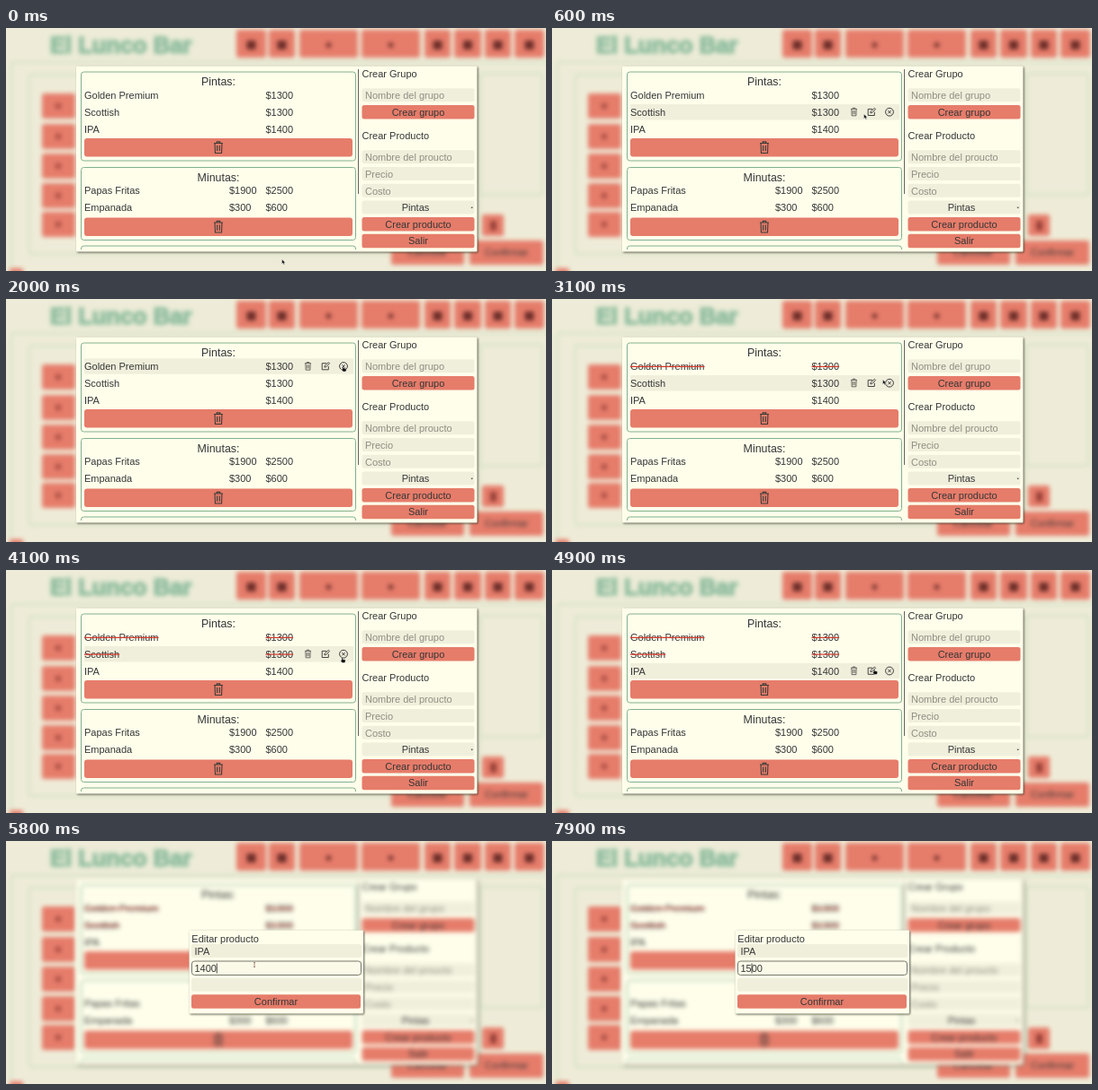
Write an HTML page that moves like this. It is 600 by 271 pixels and loops after 8000 ms.

```html
<!DOCTYPE html>
<html lang="es">
<head>
<meta charset="utf-8">
<style>
html, body { margin: 0; width: 100%; height: 100%; overflow: hidden; background: #eeecd8; }
svg { display: block; width: 600px; height: 271px; font: 11px "Liberation Sans", Arial, sans-serif; fill: #363636; }
#page { filter: blur(2.6px); }
.card { fill: #fefeeb; filter: drop-shadow(1px 1px 1px #3a3a2acc); }
.btn { fill: #e67c6a; }
.in { fill: #f0efdc; }
.ph { fill: #8f8e82; }
.h { font-size: 12.4px; }
.mid { text-anchor: middle; }
.box { fill: none; stroke: #82b08e; }
.pale { fill: none; stroke: #d3e0c3; stroke-width: 2; }
.icon { fill: none; stroke: #3c3c38; }
.strike { stroke: #d3392f; stroke-width: 1.2; }
</style>
</head>
<body>
<svg id="stage" viewBox="0 0 600 271">
  <defs>
    <path id="trash" d="M-4.5-4.5H4.5M-1.6-4.5V-6H1.6V-4.5M-3.6-4.5L-3.2 5.5H3.2L3.6-4.5M-1.2-2.3V3.4M1.2-2.3V3.4"/>
    <path id="edit" d="M1-3.5H-4V4H3.5V0M-1.2 1.2L-.8-.8L3.6-4.6L4.8-3.4L.8.8Z"/>
    <path id="close" d="M4.4 0A4.4 4.4 0 1 1-4.4 0A4.4 4.4 0 1 1 4.4 0M-1.7-1.7L1.7 1.7M1.7-1.7L-1.7 1.7"/>
  </defs>
  <g id="page"></g>
  <g id="panel"></g>
  <g id="dialog"></g>
  <g id="pointer">
    <path id="arrow" d="M0 0V5.2L1.3 4.1L2.2 6L3.2 5.5L2.3 3.7H4Z" fill="#111" stroke="#fff" stroke-width=".4"/>
    <path id="hand" d="M0 0Q.8-.6 1.2.2V2L4 2.6Q4.6 4.6 3.4 6H.6L-1.5 3.4L-.2 3.2Z" fill="#111" stroke="#fff" stroke-width=".4"/>
    <path id="beam" d="M-1-2.5H1M0-2.5V2.5M-1 2.5H1" fill="none" stroke="#93705f" stroke-width=".8"/>
  </g>
</svg>
<script>
const $ = id => document.getElementById(id);
const rect = (x, y, w, h, cls, r = 2.5) =>
  `<rect x="${x}" y="${y}" width="${w}" height="${h}" rx="${r}" class="${cls}"/>`;
const text = (x, y, s, cls = '') => `<text x="${x}" y="${y}" class="${cls}">${s}</text>`;
const icon = (name, x, y, k = 1) =>
  `<use href="#${name}" class="icon" transform="translate(${x} ${y}) scale(${k})"/>`;
const button = (x, y, w, h, label) =>
  rect(x, y, w, h, 'btn') + text(x + w / 2, y + 11.6, label, 'mid');
const input = (y, hint) => rect(395.5, y, 125, 15, 'in') + text(399, y + 11.8, hint, 'ph');

// Blurred page behind the panel
const top8 = [[256, 33], [292, 29], [326, 65], [395, 65], [465, 29], [498, 30], [532, 29], [565, 33]];
$('page').innerHTML =
  rect(6, 38, 640, 260, 'pale') + rect(26, 52, 500, 200, 'pale') + rect(527, 51, 69, 135, 'pale') +
  `<text x="49" y="28" fill="#86b799" stroke="#c0d8bd" stroke-width="3" paint-order="stroke" font-size="25.5" font-weight="700">El Lunco Bar</text>` +
  top8.map(([x, w]) => {
    const k = w > 60 ? 5 : 10;
    return rect(x, 2, w, 31, 'btn') + `<rect x="${x + w / 2 - k / 2}" y="${19 - k / 2}" width="${k}" height="${k}" fill="#6b2d28"/>`;
  }).join('') +
  [73, 107, 140, 173, 205].map(y =>
    rect(40, y, 37, 28, 'btn') + `<rect x="55" y="${y + 11}" width="6" height="6" fill="#a94e44"/>`).join('') +
  rect(529, 208, 24, 24, 'btn') + `<rect x="538" y="215" width="7" height="11" fill="#963f37"/>` +
  button(428, 237, 81, 27, '') + button(515, 237, 82, 27, '') +
  text(468, 254, 'Cancelar', 'mid') + text(556, 254, 'Confirmar', 'mid') +
  rect(4, 268, 15, 10, 'btn');

// Panel with product groups and forms
const rows = [
  { y: 75, name: 'Golden Premium', price: 1300, from: 2600 },
  { y: 93.7, name: 'Scottish', price: 1300, from: 3600 },
  { y: 112.5, name: 'IPA', price: 1400 },
  { y: 181.3, name: 'Papas Fritas', cost: 1900, price: 2500 },
  { y: 200, name: 'Empanada', cost: 300, price: 600 }
];
const group = (y, h, title) =>
  rect(83.5, y + .5, 305, h, 'box', 3) + text(236, y + 15.5, title, 'h mid') +
  rect(87, y + h - 24.5, 298, 20.5, 'btn', 3) + icon('trash', 236, y + h - 14, 1.1);

$('panel').innerHTML =
  rect(78, 42.5, 445.5, 207, 'card', 1) +
  group(48.5, 99, 'Pintas:') + group(155, 81, 'Minutas:') +
  '<path d="M83.5 247V246Q83.5 243 86.5 243H385.5Q388.5 243 388.5 246V247" class="box"/>' +
  '<path d="M391.5 46V185" stroke="#64645a"/>' +
  rows.map((r, i) => `<g id="hover${i}">${rect(87, r.y - 8.8, 299, 17.6, 'in', 1)}` +
    icon('trash', 335.5, r.y, .75) + icon('edit', 355, r.y, .95) + icon('close', 375, r.y) + '</g>' +
    `<g id="row${i}">` + text(87, r.y + 4, r.name) + (r.cost ? text(248, r.y + 4, '$' + r.cost) : '') +
    text(288.5, r.y + 4, '$' + r.price) + '</g>').join('') +
  text(395.5, 55, 'Crear Grupo') + input(67.3, 'Nombre del grupo') +
  button(395.5, 86, 125, 15.5, 'Crear grupo') +
  text(395.5, 124, 'Crear Producto') + input(136.2, 'Nombre del proucto') +
  input(155, 'Precio') + input(173.7, 'Costo') +
  rect(395.5, 192.4, 125, 15, 'in') + text(455, 204, 'Pintas', 'mid') +
  '<path d="M516.4 199.8H519L517.7 201.2Z"/>' +
  button(395.5, 211, 125, 15.5, 'Crear producto') + button(395.5, 229.8, 125, 15.5, 'Salir');

// Red lines as long as their labels
rows.forEach((r, i) => {
  if (!r.from) return;
  const lines = [...$('row' + i).children].map(el => {
    const x = +el.getAttribute('x');
    return `<path class="strike" d="M${x} ${r.y + .4}H${x + el.getComputedTextLength()}"/>`;
  });
  $('panel').insertAdjacentHTML('beforeend', `<g id="strike${i}">${lines.join('')}</g>`);
});

$('dialog').innerHTML =
  rect(203.5, 99.5, 193.5, 93, 'card', 1) + text(206.3, 112.5, 'Editar producto') +
  rect(206, 115, 189, 15, 'in') + text(209.5, 126.8, 'IPA') +
  rect(206, 134, 189, 15.5, 'in') +
  '<rect id="focus" x="206.5" y="134" width="188" height="15.5" rx="3" fill="#fbfae8" stroke="#77776c"/>' +
  '<text id="value" x="209.5" y="145.7"></text>' +
  '<path id="caret" d="M0 136.5V147.5" stroke="#333" stroke-width=".9"/>' +
  rect(206, 152.7, 189, 15, 'in') + button(206, 171.2, 188, 15.5, 'Confirmar');

// Pointer stops: time, x, y
const path = [
  [0, 306.5, 258], [100, 308, 250], [600, 346.5, 96], [900, 352, 90], [1300, 361.5, 74],
  [1800, 372, 75], [2000, 374, 75], [2800, 374, 75], [3100, 367.5, 90], [3300, 374, 93],
  [4000, 374, 93], [4400, 370, 111], [4600, 370, 111], [4900, 357.5, 110.5],
  [5100, 357.5, 111], [5500, 276, 138], [8000, 276, 138]
];
const OPEN = 5100, FOCUS = 5600;
// Field states: time, value, caret index
const edits = [[0, '1400', 4], [6500, '1400', 3], [6800, '1400', 2], [7500, '100', 1], [7900, '1500', 2]];

function pointerAt(t) {
  const i = path.findIndex(p => p[0] > t);
  const [a, b] = [path[i - 1], path[i]];
  const k = (t - a[0]) / (b[0] - a[0]);
  return [a[1] + (b[1] - a[1]) * k, a[2] + (b[2] - a[2]) * k];
}
const show = (id, on) => $(id).style.display = on ? '' : 'none';

function draw(now) {
  const t = Math.floor(now % 8000 / 100) * 100;
  const [x, y] = pointerAt(t);
  const open = t >= OPEN, focused = t >= FOCUS;
  let hovered = false;
  rows.forEach((r, i) => {
    const over = !open && x > 87 && x < 386 && Math.abs(y + 1 - r.y) < 9.3;
    hovered = hovered || over;
    show('hover' + i, over);
    if (r.from) show('strike' + i, t >= r.from);
  });
  $('panel').style.filter = open ? 'blur(2.4px)' : '';
  show('dialog', open);
  show('focus', focused);

  const [, value, at] = edits.filter(e => e[0] <= t).pop();
  $('value').textContent = value;
  show('caret', focused);
  $('caret').setAttribute('transform', `translate(${209.8 + at * 6.12} 0)`);

  const hand = hovered && [335.5, 355, 375].some(c => Math.abs(x - c) < 4.5);
  const beam = open && x < 395 && y > 115;
  show('arrow', !hand && !beam);
  show('hand', hand);
  show('beam', beam);
  show('pointer', t < 7500);
  $('pointer').setAttribute('transform', `translate(${x} ${y})`);
  requestAnimationFrame(tick);
}
const start = performance.now();
const tick = () => draw(performance.now() - start);
tick();
</script>
</body>
</html>
```
